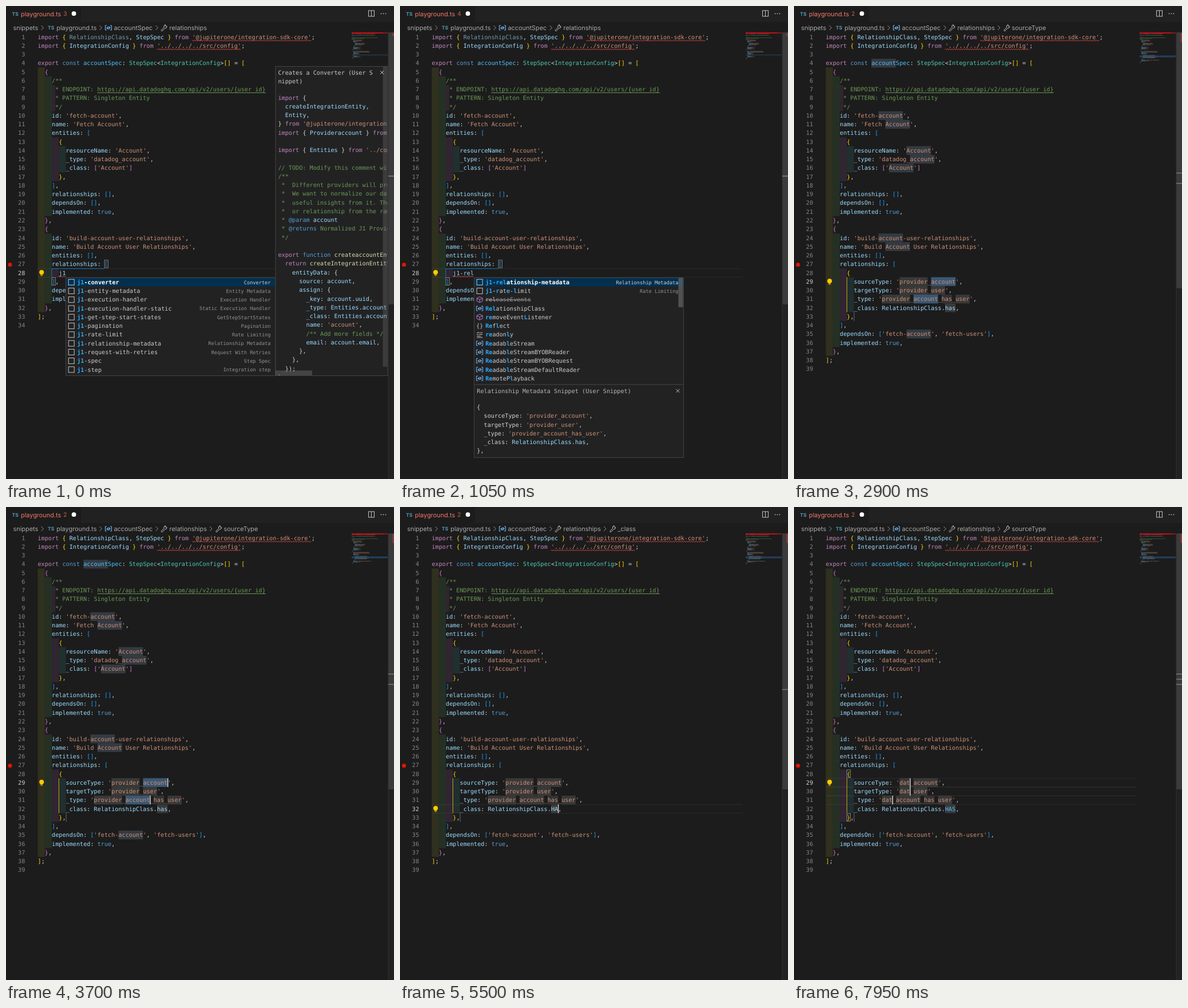
These frames come from a looping animation (678x826 px, 8000 ms). An HTML page with a canvas:

```html
<!DOCTYPE html>
<html lang="en">
<head>
<meta charset="utf-8">
<title>Snippet demo</title>
<style>
html, body { margin: 0; width: 678px; height: 826px; overflow: hidden; background: #1c1c1c; }
canvas { display: block; }
</style>
</head>
<body>
<canvas id="stage" width="678" height="826"></canvas>
<script>
const ctx = document.getElementById('stage').getContext('2d');
ctx.textRendering = 'geometricPrecision';

const LOOP = 8000, CHAR = 6.132, ROW = 15.257, LEFT = 55.5, TOP = 46.4;
const mono = (size = 10.185, weight = '') => `${weight} ${size}px "DejaVu Sans Mono", monospace`;
const sans = (size = 10.9, weight = '') => `${weight} ${size}px Inter, sans-serif`;
const GREEN = '#6a9955', STRING = '#ce9178', IDENT = '#9cdcfe', PLAIN = '#d4d4d4';
const BRACKETS = ['#ffd700', '#da70d6', '#179fff'];
const BANDS = ['255,255,64', '127,255,127', '255,127,255', '79,236,236'];
const WORDS = { import: '#c586c0', export: '#c586c0', from: '#c586c0', return: '#c586c0',
  const: '#569cd6', function: '#569cd6', true: '#569cd6' };

const head = `import { RelationshipClass, StepSpec } from '@jupiterone/integration-sdk-core';
import { IntegrationConfig } from '../../../../src/config';

export const accountSpec: StepSpec<IntegrationConfig>[] = [
  {
    /**
     * ENDPOINT: https://api.datadoghq.com/api/v2/users/{user_id}
     * PATTERN: Singleton Entity
     */
    id: 'fetch-account',
    name: 'Fetch Account',
    entities: [
      {
        resourceName: 'Account',
        _type: 'datadog_account',
        _class: ['Account']
      },
    ],
    relationships: [],
    dependsOn: [],
    implemented: true,
  },
  {
    id: 'build-account-user-relationships',
    name: 'Build Account User Relationships',
    entities: [],
    relationships: [`.split('\n');

const snippet = `      {
        sourceType: '<p>_<a>',
        targetType: '<p>_<u>',
        _type: '<p>_<a>_has_<u>',
        _class: RelationshipClass.<h>,
      },`.split('\n');

const shortTail = `    ],
    dependsOn: [],
    implemented: true,
  },
];
`.split('\n');
const fullTail = shortTail.map(s => s.replace('[]', "['fetch-account', 'fetch-users']"));

const converterDoc = `import {
  createIntegrationEntity,
  Entity,
} from '@jupiterone/integration-sdk-core';
import { Provideraccount } from '../types';

import { Entities } from '../constants';

// TODO: Modify this comment with details
/**
 *  Different providers will provide data
 *  We want to normalize our data to get
 *  useful insights from it. The entity
 *  or relationship from the raw data
 * @param account
 * @returns Normalized J1 Provider entity
 */

export function createaccountEntity(
  return createIntegrationEntity({
    entityData: {
      source: account,
      assign: {
        _key: account.uuid,
        _type: Entities.account._type,
        _class: Entities.account._class,
        name: 'account',
        /** Add more fields */
        email: account.email,
      },
    },
  });
}`.split('\n');

const metadataDoc = `{
  sourceType: 'provider_account',
  targetType: 'provider_user',
  _type: 'provider_account_has_user',
  _class: RelationshipClass.has,
},`.split('\n');

const shortList = [['j1-converter', 'Converter'], ['j1-entity-metadata', 'Entity Metadata'],
  ['j1-execution-handler', 'Execution Handler'], ['j1-execution-handler-static', 'Static Execution Handler'],
  ['j1-get-step-start-states', 'GetStepStartStates'], ['j1-pagination', 'Pagination'],
  ['j1-rate-limit', 'Rate Limiting'], ['j1-relationship-metadata', 'Relationship Metadata'],
  ['j1-request-with-retries', 'Request With Retries'], ['j1-spec', 'Step Spec'], ['j1-step', 'Integration step']];
const longList = [['j1-relationship-metadata', 'Relationship Metadata'], ['j1-rate-limit', 'Rate Limiting'],
  ['releaseEvents', '', 'cube'], ['RelationshipClass', '', 'var'], ['removeEventListener', '', 'cube'],
  ['Reflect', '', 'braces'], ['readonly', '', 'keyword'], ['ReadableStream', '', 'var'],
  ['ReadableStreamBYOBReader', '', 'var'], ['ReadableStreamBYOBRequest', '', 'var'],
  ['ReadableStreamDefaultReader', '', 'var'], ['RemotePlayback', '', 'var']];

// Each step overrides the editor state from its start time on.
const SOURCE = { line: 29, bulb: 29, crumb: 'sourceType' };
const steps = [
  [0, { typed: 'j1', errors: 3 }],
  [450, { typed: 'j1-re' }],
  [600, { typed: 'j1-rel', errors: 4 }],
  [2100, { typed: null, errors: 2, field: 'p', p: 'provider', a: 'account', u: 'user', h: 'has', ...SOURCE }],
  [2350, { field: 'a' }],
  [4300, { field: 'u', line: 30, crumb: 'targetType' }],
  [4700, { bulb: 30 }],
  [5000, { field: 'h', line: 32, bulb: 32, crumb: '_class' }],
  [5350, { h: 'H', empty: true }],
  [5450, { h: 'HA' }],
  [5550, { h: 'HAS' }],
  [6050, { field: 'u', empty: false, line: 30, bulb: 31, crumb: 'targetType' }],
  [6300, { field: 'a', line: 29, crumb: '_type' }],
  [6500, { field: 'p' }],
  [6850, SOURCE],
  [7600, { p: 'd', empty: true, resolved: true }],
  [7750, { p: 'da' }],
  [7900, { p: 'dat' }]];

function stateAt(t) {
  const state = { since: 0 };
  for (const [start, change] of steps) {
    if (start > t) break;
    Object.assign(state, change);
    if ('field' in change || 'p' in change || 'h' in change) state.since = start;
  }
  return state;
}

function buildDocument(state) {
  if (state.typed) return { lines: [...head, '      ' + state.typed, ...shortTail], fields: [] };
  const fields = [];
  const filled = snippet.map((row, i) => {
    let out = '';
    for (const part of row.split(/(<\w>)/)) {
      const key = /^<(\w)>$/.exec(part)?.[1];
      if (key) fields.push({ key, line: 28 + i, col: out.length, len: state[key].length });
      out += key ? state[key] : part;
    }
    return out;
  });
  return { lines: [...head, ...filled, ...fullTail], fields };
}

const rowY = n => TOP + (n - 1) * ROW;
const colX = c => LEFT + c * CHAR;
function rect(x, y, w, h, color) { ctx.fillStyle = color; ctx.fillRect(x, y, w, h); }
function box(x, y, w, h, color) { ctx.strokeStyle = color; ctx.lineWidth = 1; ctx.strokeRect(x, y, w, h); }
function text(s, x, y, color, font = mono(), align = 'left') {
  ctx.font = font; ctx.fillStyle = color; ctx.textAlign = align; ctx.fillText(s, x, y);
}
function path(points, color, width = 1, closed = false) {
  ctx.beginPath();
  points.forEach(([x, y]) => ctx.lineTo(x, y));
  if (closed) ctx.closePath();
  ctx.strokeStyle = color; ctx.lineWidth = width; ctx.stroke();
}
function dot(x, y, r, color) { ctx.fillStyle = color; ctx.beginPath(); ctx.arc(x, y, r, 0, 7); ctx.fill(); }
function squiggle(x0, x1, y) {
  const points = [];
  for (let x = x0, i = 0; x <= x1; x += 2, i++) points.push([x, y + (i % 2 ? 1 : -1)]);
  path(points, '#e5484d');
}

function tokenize(line, { depth = null, labels = false, resolved = false } = {}) {
  const tokens = [];
  const add = (s, col, color) => tokens.push({ s, col, color });
  const pattern = /(\/\/.*|\/\*\*.*|^\s+\*.*)|('[^']*'?)|([A-Za-z_]\w*)|([{}[\]()])|([^\s\w])/g;
  for (const m of line.matchAll(pattern)) {
    const [s, comment, string, word, bracket] = m;
    let col = m.index;
    if (comment) {
      for (const part of s.split(/(@\w+|(?<=@param) account)/)) {
        add(part, col, part[0] === '@' ? '#569cd6' : part === ' account' ? IDENT : GREEN);
        col += part.length;
      }
    } else if (string) add(s, col, STRING);
    else if (word) {
      const next = line[col + s.length];
      let color = WORDS[s] || (next === '(' ? '#dcdcaa' : labels && next === ':' ? PLAIN : IDENT);
      if (line.startsWith('export const')) {
        if (s === 'accountSpec') color = '#4fc1ff';
        if (/^(StepSpec|IntegrationConfig)$/.test(s)) color = '#4ec9b0';
      }
      if (s === 'HAS' && resolved) color = '#4fc1ff';
      add(s, col, color);
    } else if (bracket && depth) {
      if ('}])'.includes(s)) depth.n--;
      add(s, col, BRACKETS[depth.n % 3]);
      if ('{[('.includes(s)) depth.n++;
    } else add(s, col, PLAIN);
  }
  return tokens;
}

function drawBands(lines) {
  lines.forEach((line, i) => {
    const indent = /^ */.exec(line)[0].length;
    for (let c = 0; c < indent; c += 2)
      rect(colX(c), rowY(i + 1), Math.min(2, indent - c) * CHAR, ROW + .1, `rgba(${BANDS[c / 2 % 4]},.085)`);
  });
}

function lineBorder(n) {
  rect(LEFT, rowY(n), 542.5, 1, '#2b2b2b');
  rect(LEFT, rowY(n) + ROW - .5, 542.5, 1, '#2b2b2b');
}

function bracketBox(n, col) { box(colX(col) + .2, rowY(n) + .8, CHAR, ROW - 2, '#858585'); }

function drawHighlights(state, doc) {
  const word = state.empty ? null : { a: /account/gi, u: /user/gi }[state.field];
  if (word) doc.lines.forEach((line, i) => {
    if (i > 27 && i < 32) return;
    for (const m of line.matchAll(word))
      rect(colX(m.index), rowY(i + 1), m[0].length * CHAR, ROW, '#343a41');
  });
  for (const f of doc.fields) {
    const selected = f.key === state.field && !state.empty;
    rect(colX(f.col), rowY(f.line), f.len * CHAR, ROW, selected ? '#3b5873' : '#393939');
  }
  const has = doc.lines[30].indexOf('_has_');
  if (doc.fields.length) rect(colX(has + 1), rowY(31), 3 * CHAR, ROW, '#333333');
}

function bulb(n) {
  const y = rowY(n) + 6.6;
  dot(62.2, y, 4, '#ffcc00');
  rect(60.4, y + 2.5, 3.6, 3.8, '#ffcc00');
  rect(60.4, y + 4.6, 3.6, .7, '#1c1c1c');
}

function drawEditor(state, t) {
  const doc = buildDocument(state);
  const { lines, fields } = doc;
  const active = state.typed ? 28 : state.line;
  const live = fields.filter(f => f.key === state.field);
  if (state.typed) lineBorder(28);
  if (state.empty) live.forEach(f => lineBorder(f.line));
  drawBands(lines);
  drawHighlights(state, doc);

  const depth = { n: 0 };
  const tokenLines = lines.map(line => tokenize(line, { depth, resolved: state.resolved }));
  tokenLines.forEach((tokens, i) => {
    const y = rowY(i + 1) + 11.2;
    text(i + 1, 33.3, y, i + 1 === active ? '#d0d0d0' : '#858585', mono(), 'right');
    for (const { s, col, color } of tokens) {
      ctx.globalAlpha = i === 0 && s === 'RelationshipClass' && state.typed ? .67 : 1;
      text(s, colX(col), y, color);
    }
    ctx.globalAlpha = 1;
  });
  rect(159.5, rowY(7) + 13, 294.5, 1, GREEN);
  squiggle(colX(44), colX(78), rowY(1) + 14);
  squiggle(colX(34), colX(58), rowY(2) + 14);
  dot(7, 451.8, 3.5, '#e51400');

  if (state.typed) {
    squiggle(colX(6), colX(6 + state.typed.length), rowY(28) + 14);
    path([[colX(19), rowY(28) + .3], [80, rowY(28) + .3], [80, rowY(29)]], '#1574b8');
    bracketBox(27, 19);
    bracketBox(29, 4);
    bulb(28);
  } else {
    path([[92.4, rowY(29)], [92.4, rowY(33)]], '#c9ab10');
    rect(colX(8), rowY(33), 1, ROW, '#6c6c6c');
    if (state.empty && state.field === 'p') { bracketBox(28, 6); bracketBox(33, 6); }
    bulb(state.bulb);
    if ((t - state.since) % 1000 < 500)
      live.forEach(f => rect(colX(f.col + f.len) - .3, rowY(f.line), 1.4, ROW, '#d8d8d8'));
  }
  drawMinimap(state, tokenLines, live);
}

function drawMinimap(state, tokenLines, live) {
  const step = 1.4, y0 = 46.5;
  rect(604, y0 - .6, 63, 2.2, '#8b1519');
  tokenLines.forEach((tokens, i) => tokens.forEach(({ s, col, color }) => {
    ctx.globalAlpha = i < 2 ? .75 : .4;
    rect(604 + col * .7, y0 + i * step, s.length * .7, 1, i < 2 ? '#e01b20' : color);
  }));
  ctx.globalAlpha = 1;
  if (state.typed) rect(604, 85, 63, 1, '#20475a');
  else rect(604, 86.5, 63, 3, 'rgba(38,90,140,.6)');

  rect(668, 46, 10, 780, '#222222');
  rect(668, 46, 10, state.typed ? 475 : 447, '#3b3b3b');
  rect(667.5, 46, 1, 780, '#303030');
  rect(675.5, 47, 2.5, state.typed ? 6 : 16, '#8a3b3d');
  if (state.typed) rect(668, 296.3, 10, 1.5, '#858585');
  else live.forEach(f => rect(668, 291 + (f.line - 29) * 9, 10, 1.3, '#808080'));
}

function icon(kind, x, y) {
  const blue = '#75beff', grey = '#c5c5c5';
  if (kind === 'cube') {
    path([[x, y - 5], [x + 5, y - 2.5], [x + 5, y + 2.5], [x, y + 5], [x - 5, y + 2.5], [x - 5, y - 2.5]], '#b180d7', 1, true);
    path([[x - 5, y - 2.5], [x, y], [x + 5, y - 2.5]], '#b180d7');
    path([[x, y], [x, y + 5]], '#b180d7');
  } else if (kind === 'var') {
    path([[x - 3, y - 4], [x - 5.5, y - 4], [x - 5.5, y + 4], [x - 3, y + 4]], blue);
    path([[x + 3, y - 4], [x + 5.5, y - 4], [x + 5.5, y + 4], [x + 3, y + 4]], blue);
    path([[x - 3, y], [x, y - 2], [x + 3, y - 1], [x + 3, y + 1], [x, y + 2.4], [x - 3, y + 1]], blue, 1, true);
    path([[x - 3, y], [x, y + .6], [x + 3, y - 1]], blue);
  } else if (kind === 'braces') text('{}', x, y + 3.5, grey, mono(10), 'center');
  else if (kind === 'keyword') {
    for (const [dx, dy, w] of [[-5, -4, 5], [1, -4, 4], [-5, -1, 3], [-1, -1, 6], [-5, 2, 7], [-5, 4.5, 10]])
      rect(x + dx, y + dy, w, 1, grey);
  } else box(x - 5, y - 5, 10, 10, grey);
}

function closeIcon(x, y) {
  path([[x - 3, y - 3], [x + 3, y + 3]], '#c5c5c5');
  path([[x - 3, y + 3], [x + 3, y - 3]], '#c5c5c5');
}

function panel(x, y, w, h) {
  rect(x, y, w, h, '#222223');
  box(x + .5, y + .5, w - 1, h - 1, '#434343');
}

function suggestRow([label, detail, kind], x, y, query, selected, right) {
  icon(kind, x - 10, y);
  let pending = label.startsWith('j1') ? query : query.replace('j1-', '');
  const deprecated = label === 'releaseEvents';
  for (let i = 0, end; i < label.length; i = end) {
    const hit = c => pending[0] === c.toLowerCase();
    const matched = hit(label[i]);
    for (end = i; end < label.length && hit(label[end]) === matched; end++)
      if (matched) pending = pending.slice(1);
    const color = deprecated ? '#8b8b8b' : matched ? '#2aaaff' : selected ? '#ffffff' : '#cccccc';
    text(label.slice(i, end), x + i * CHAR, y + 3.6, color, mono(10.185, matched || selected ? 'bold' : ''));
  }
  if (deprecated) rect(x, y, label.length * CHAR, 1, '#a0a0a0');
  text(detail, right, y + 3.2, selected ? '#d0d0d0' : '#929292', mono(8.65), 'right');
}

function suggestList(list, x, query, right) {
  rect(x + 1, 475, 365, 15, '#04304f');
  list.forEach((row, i) => suggestRow(row, x + 20.2, 482.3 + i * 15.26, query, i === 0, right));
}

function docLines(lines, x, y, options) {
  lines.forEach((line, i) => {
    for (const { s, col, color } of tokenize(line, options)) text(s, x + col * CHAR, y + i * ROW, color);
  });
}

function drawSuggest(state) {
  if (state.typed === 'j1') {
    panel(104, 474, 367, 172);
    suggestList(shortList, 104, 'j1', 462.5);
    panel(470.5, 105, 197, 541);
    ctx.save();
    ctx.beginPath(); ctx.rect(471, 106, 195.5, 539); ctx.clip();
    text('Creates a Converter (User S', 475.5, 119.6, '#cccccc');
    text('nippet)', 475.5, 134.8, '#cccccc');
    docLines(converterDoc, 475.5, 163.6);
    rect(658.5, 106, 8, 524, 'rgba(121,121,121,.3)');
    rect(471, 636.5, 64, 8.5, 'rgba(121,121,121,.4)');
    ctx.restore();
    closeIcon(657, 116);
  } else {
    panel(129, 474, 367, 187.5);
    suggestList(longList, 129, state.typed, 486.5);
    rect(486.5, 475, 8, 51, 'rgba(121,121,121,.55)');
    panel(129, 660.5, 367, 128.5);
    text('Relationship Metadata Snippet (User Snippet)', 134.3, 675.5, '#b8b8b8');
    closeIcon(485.5, 672);
    docLines(metadataDoc, 134.3, 704, { labels: true });
  }
}

function chevron(x) { path([[x - 2, 34], [x + 2, 38], [x - 2, 42]], '#909090'); }
function wrench(x) {
  path([[x - 5, 42.5], [x, 37.5], [x, 34.5], [x + 2.5, 32.5], [x + 2.5, 35], [x + 5, 35.2],
    [x + 4.5, 38], [x + 1.7, 39], [x - 3.5, 44]], '#c5c5c5', 1, true);
}

function drawHeader(state) {
  rect(131, 0, 547, 28, '#212122');
  text('TS', 10.5, 17, '#519aba', sans(8.5, 'bold'));
  text('playground.ts', 26, 17.6, '#f1786b', sans());
  text(state.errors, 100.3, 17.4, '#c95f56', sans(10.3));
  dot(118.6, 13.2, 3.9, '#ffffff');
  box(633.5, 8, 10, 10, '#c5c5c5');
  path([[638.5, 8], [638.5, 18]], '#c5c5c5');
  for (const x of [655.5, 659.5, 663.5]) dot(x, 13.3, .9, '#c5c5c5');

  const crumb = (s, x) => text(s, x, 41.8, '#a9a9a9', sans());
  crumb('snippets', 12.5);
  chevron(63.5);
  text('TS', 73, 41, '#519aba', sans(8.5, 'bold'));
  crumb('playground.ts', 88.3);
  chevron(165.5);
  icon('var', 179, 38);
  crumb('accountSpec', 188.5);
  chevron(263.5);
  wrench(276);
  crumb('relationships', 285.5);
  if (state.crumb) {
    chevron(358);
    wrench(371.5);
    crumb(state.crumb, 380.5);
  }
}

function draw(t) {
  const state = stateAt(t);
  rect(0, 0, 678, 826, '#1c1c1c');
  drawEditor(state, t);
  if (state.typed) drawSuggest(state);
  drawHeader(state);
}

function tick(now) {
  draw(now % LOOP);
  requestAnimationFrame(tick);
}
draw(0);
requestAnimationFrame(tick);
</script>
</body>
</html>
```
